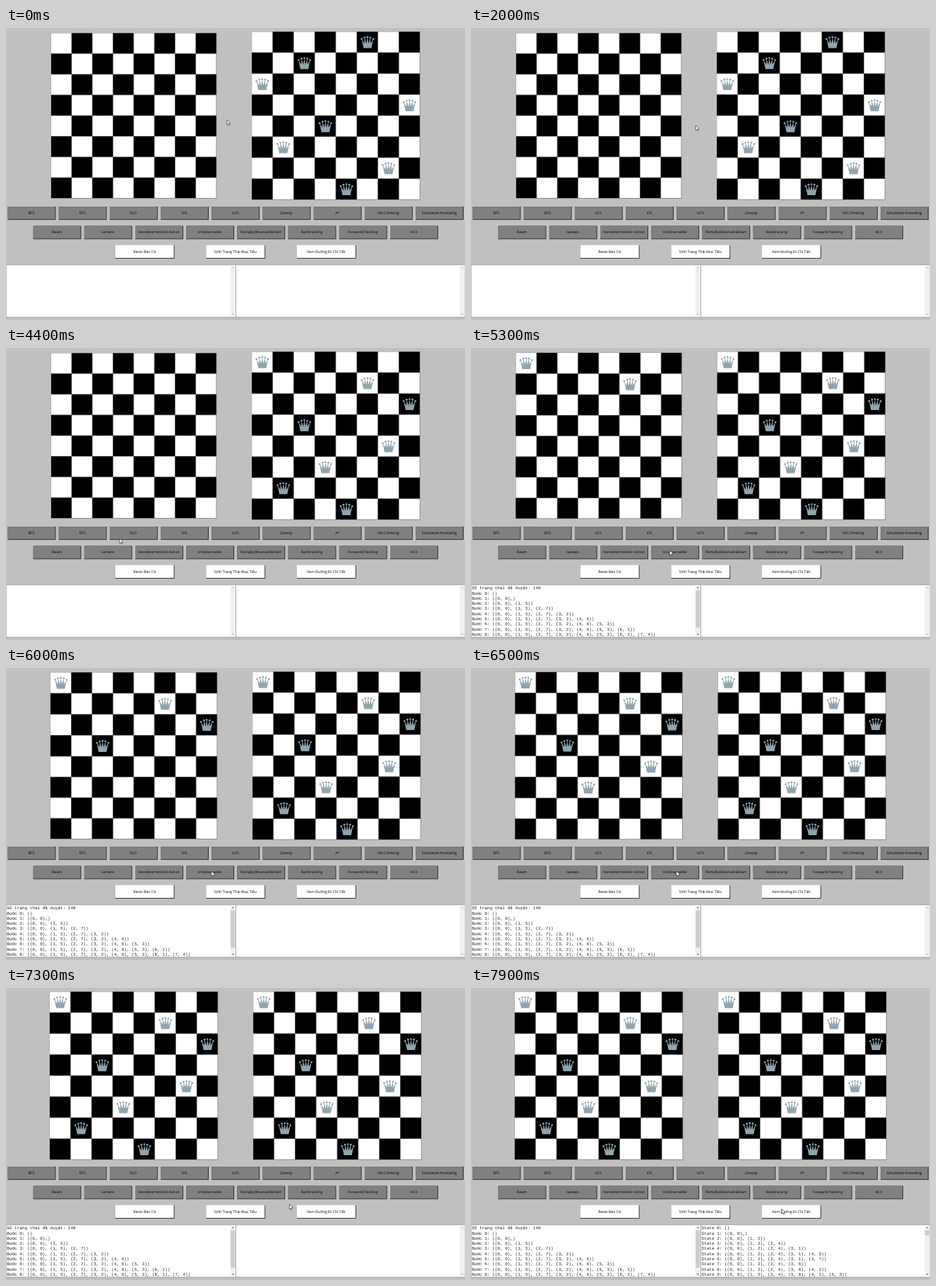
Recreate the animation shown at these times as an HTML page with a canvas. Size 650 by 414 pixels, loop 8 s.

```html
<!DOCTYPE html>
<html lang="vi">
<head>
<meta charset="utf-8">
<title>8 queens</title>
<style>
  html, body { margin: 0; width: 100%; height: 100%; overflow: hidden; background: #c0c0c0; }
  canvas { display: block; }
</style>
</head>
<body>
<canvas id="stage" width="650" height="414"></canvas>
<script>
const ctx = document.getElementById('stage').getContext('2d', { alpha: false });
ctx.textRendering = 'geometricPrecision';
const LOOP = 8000, N = 8;
const GOAL_AT = 3300, SOLVE_AT = 4800, DETAIL_AT = 7600;
const FIRST_QUEEN = 4900, QUEEN_STEP = 300;

// Depth-first search: yields every conflict-free placement, one queen column per row.
function* search(cols = []) {
  yield cols;
  if (cols.length === N) return;
  for (let c = 0; c < N; c++) {
    const safe = cols.every((q, r) => q !== c && Math.abs(q - c) !== cols.length - r);
    if (safe) yield* search([...cols, c]);
  }
}
const visited = [...search()];
const START = [5, 2, 0, 7, 3, 1, 6, 4];
const GOAL = visited.filter(cols => cols.length === N)[1];

// Python-style tuple of (row, column) pairs
const tuple = cols => {
  const pairs = cols.map((c, r) => `(${r}, ${c})`);
  return `(${pairs.join(', ')}${pairs.length === 1 ? ',' : ''})`;
};
const solution = ['Số trạng thái đã duyệt: 148',
  ...Array.from({ length: N + 1 }, (_, i) => `Bước ${i}: ${tuple(GOAL.slice(0, i))}`)];
const states = visited.slice(0, 10).map((cols, i) => `State ${i}: ${tuple(cols)}`);

const BUTTON_ROWS = [
  { w: 67, pitch: 72.2, fill: '#808080', labels: ['BFS', 'DFS', 'DLS', 'IDS', 'UCS', 'Greedy', 'A*', 'Hill Climbing', 'Simulated Annealing'] },
  { w: 67, pitch: 72.2, fill: '#808080', labels: ['Beam', 'Genetic', 'Nondeterministic Action', 'Unobservable', 'PartiallyObservableStart', 'Backtracking', 'ForwardChecking', 'AC3'] },
  { w: 83, pitch: 128.6, fill: '#fff', labels: ['Reset Bàn Cờ', 'Sinh Trạng Thái Mục Tiêu', 'Xem Đường Đi Chi Tiết'] }
];

// Pointer moves: start time, end time, destination
const MOVES = [
  [100, 200, 338, 137], [600, 700, 324, 137], [1000, 1100, 318, 138], [2100, 2900, 326, 306],
  [3300, 3600, 331, 295], [3700, 4400, 161, 270], [4800, 5400, 291, 288], [6900, 7500, 440, 313]
];

function pointerAt(t) {
  let x = 313, y = 130;
  for (const [from, to, toX, toY] of MOVES) {
    const u = Math.min(1, Math.max(0, (t - from) / (to - from)));
    const eased = u * u * (3 - 2 * u);
    x += (toX - x) * eased;
    y += (toY - y) * eased;
  }
  return [x, y];
}

function rect(x, y, w, h, color) {
  ctx.fillStyle = color;
  ctx.fillRect(x, y, w, h);
}

function polygon(points, x, y) {
  ctx.beginPath();
  points.forEach(([px, py]) => ctx.lineTo(x + px, y + py));
  ctx.closePath();
  ctx.fill();
}

// Five thin spikes with round tips, fanning out of a solid base
function queen(x, y) {
  ctx.fillStyle = '#90a4ae';
  const outline = [[-5.6, 8.4]];
  for (let i = -2; i <= 2; i++) {
    const tipX = i * 4.1, tipY = -7.2 + i * i * .7;
    ctx.beginPath();
    ctx.arc(x + tipX, y + tipY, 1.35, 0, 7);
    ctx.fill();
    outline.push([tipX, tipY]);
    if (i < 2) outline.push([(i + .5) * 2.9, 1.8]);
  }
  polygon([...outline, [5.6, 8.4]], x, y);
}

// Rows and columns holding a queen are slightly larger, so a board grows as it fills.
function board(cx, cy, queens) {
  const edges = occupied => {
    const out = [0];
    for (let i = 0; i < N; i++) out.push(out[i] + (occupied(i) ? 29.8 : 29.3));
    return out;
  };
  const xs = edges(c => queens.includes(c)), ys = edges(r => r < queens.length);
  const left = cx - xs[N] / 2, top = cy - ys[N] / 2;
  rect(left, top, xs[N], ys[N], '#666');
  for (let r = 0; r < N; r++) for (let c = 0; c < N; c++) {
    const x = left + xs[c], y = top + ys[r], w = xs[c + 1] - xs[c], h = ys[r + 1] - ys[r];
    rect(x + .2, y + .2, w - .8, h - .8, (r + c) % 2 ? '#000' : '#fff');
    if (queens[r] === c) queen(x + w / 2, y + h / 2);
  }
}

function buttons() {
  ctx.font = '5.2px "Open Sans", "Noto Sans", sans-serif';
  ctx.textAlign = 'center';
  BUTTON_ROWS.forEach(({ w, pitch, fill, labels }, row) => labels.forEach((label, i) => {
    const cx = 324.8 + (i - (labels.length - 1) / 2) * pitch;
    const left = cx - w / 2, y = 253 + row * 27.5;
    rect(left - .4, y - .4, w + 1.2, 19.2, '#ddd');
    rect(left, y, w + .9, 18.9, '#222');
    rect(left, y, w, 18, fill);
    ctx.fillStyle = '#000';
    ctx.fillText(label, cx, y + 10.9);
  }));
}

function panel(x, w, lines, thumb) {
  rect(x, 335.5, w, 75, '#999');
  rect(x + .6, 336.2, w - 1, 73.4, '#fff');
  const bar = x + w - 7.5;
  rect(bar, 336.2, 7, 73.4, '#f0f0f0');
  if (lines) rect(bar + .4, 343.5, 6.2, thumb, '#cdcdcd');
  ctx.fillStyle = lines ? '#666' : '#bbb';
  polygon([[-1.5, 1], [0, -1], [1.5, 1]], bar + 3.5, 339.5);
  polygon([[-1.5, -1], [0, 1], [1.5, -1]], bar + 3.5, 406);
  if (!lines) return;
  ctx.font = '6.03px "Liberation Mono", monospace';
  ctx.textAlign = 'left';
  ctx.fillStyle = '#222';
  lines.forEach((line, i) => ctx.fillText(line, x + 1.2, 342.3 + i * 7.28));
}

function pointer([x, y]) {
  ctx.fillStyle = '#fff';
  ctx.strokeStyle = '#333';
  ctx.lineWidth = .7;
  polygon([[0, 0], [0, 7], [1.6, 5.6], [2.7, 8], [3.8, 7.5], [2.8, 5.2], [4.9, 5]], x, y);
  ctx.stroke();
}

function draw(now) {
  const t = Math.floor(now % LOOP / 100) * 100;
  const placed = Math.min(N, Math.max(0, Math.floor((t - FIRST_QUEEN) / QUEEN_STEP) + 1));
  rect(0, 0, 650, 414, '#c0c0c0');
  board(181, 124.4, GOAL.slice(0, placed));
  board(467.2 + placed / 4, 124.4, t < GOAL_AT ? START : GOAL);
  buttons();
  panel(0, 325.3, t >= SOLVE_AT && solution, 53);
  panel(325.3, 324.7, t >= DETAIL_AT && states, 7);
  pointer(pointerAt(t));
  requestAnimationFrame(draw);
}
requestAnimationFrame(draw);
</script>
</body>
</html>
```
